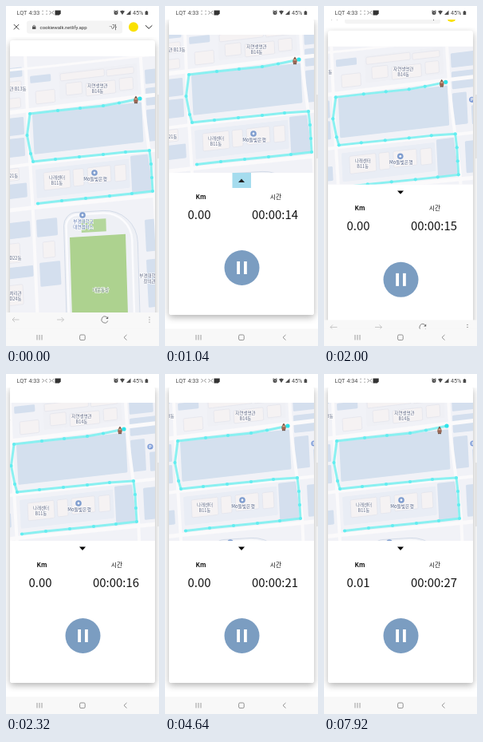
These frames come from a looping animation (192x426 px, 8000 ms). An HTML page with a canvas:

```html
<!DOCTYPE html>
<html lang="ko">
<head>
<meta charset="utf-8">
<title>Walk tracker</title>
<style>
html, body { margin: 0; width: 100%; height: 100%; overflow: hidden; background: #fff; }
canvas { display: block; width: 192px; height: 426px; }
</style>
</head>
<body>
<canvas id="stage"></canvas>
<script>
const W = 192, H = 426, LOOP = 8000, STEP = 80, HEAD = 27;
const KR = '"Noto Sans CJK KR", "Noto Sans CJK", sans-serif';
const UI = 'Roboto, "Noto Sans", sans-serif';
const BLUE = '#d4dfee', PALE = '#e9edf5';
const canvas = document.getElementById('stage');
const c = canvas.getContext('2d');
const dpr = window.devicePixelRatio || 1;
canvas.width = W * dpr;
canvas.height = H * dpr;

// keyframes: [time, value...]
const HEADER = [[80, 1], [560, 0], [1200, 0], [1680, 0.85], [1840, 0.85], [2240, 0]];
const PAN = [[80, 0, 0], [880, 0, -22], [1200, 0, -22], [1680, -10.5, 3], [2320, -20, -20], [2800, -14, -24]];
const WALKER = [[0, 163, 117.5], [4880, 163, 117.5], [5120, 163, 120.5], [6560, 163, 120.5], [7360, 159, 121.5]];
const ROUTE = [[168, 116], [142, 121.5], [122, 125], [93, 128], [65, 131], [30, 135], [26.5, 162], [31, 185],
  [34, 195], [62, 192], [92, 189], [122, 186], [150, 183], [180, 181], [182, 198], [183, 215], [184, 232],
  [158, 235], [130, 238], [100, 241], [70, 244], [40, 247.5]];

function at(keys, t) {
  if (t <= keys[0][0]) return keys[0].slice(1);
  for (let i = 1; i < keys.length; i++) {
    const a = keys[i - 1], b = keys[i];
    if (t < b[0]) {
      const u = (t - a[0]) / (b[0] - a[0]), e = u * u * (3 - 2 * u);
      return a.slice(1).map((v, k) => v + (b[k + 1] - v) * e);
    }
  }
  return keys[keys.length - 1].slice(1);
}

function rect(x, y, w, h, fill) { c.fillStyle = fill; c.fillRect(x, y, w, h); }

function round(x, y, w, h, r, fill) {
  c.beginPath(); c.roundRect(x, y, w, h, r);
  c.fillStyle = fill; c.fill();
}

function disc(x, y, r, fill) {
  c.beginPath(); c.arc(x, y, r, 0, Math.PI * 2);
  c.fillStyle = fill; c.fill();
}

function poly(pts, fill) {
  c.beginPath(); pts.forEach(p => c.lineTo(...p)); c.closePath();
  c.fillStyle = fill; c.fill();
}

function line(pts, color, width = 1) {
  c.beginPath(); pts.forEach((p, i) => i ? c.lineTo(...p) : c.moveTo(...p));
  c.strokeStyle = color; c.lineWidth = width; c.stroke();
}

function text(s, x, y, font, color, align = 'center') {
  c.font = font; c.fillStyle = color; c.textAlign = align;
  c.fillText(s, x, y);
}

// block following the tilt of the streets
function block(x, y, w, h, fill, edge) {
  c.save();
  c.transform(1, -0.115, 0.05, 1, x, y);
  round(0, 0, w, h, 1.5, fill);
  if (edge) { c.strokeStyle = edge; c.lineWidth = 0.5; c.stroke(); }
  c.restore();
}

const house = (x, y, w, h) => block(x, y, w, h, '#f5f2f3', '#dcdee8');

function label(s, x, y, color = '#5a6480', size = 5.5) {
  c.font = `500 ${size}px ${KR}`;
  c.textAlign = 'center';
  c.strokeStyle = 'rgba(255,255,255,.85)';
  c.lineWidth = 1.4;
  c.strokeText(s, x, y);
  text(s, x, y, c.font, color);
}

function pin(x, y) {
  disc(x, y, 3.8, '#7f9dcf');
  disc(x, y, 1.4, '#fff');
}

function stadium() {
  c.save();
  c.transform(1, -0.06, 0.03, 1, 80, 290);
  round(-7, -31, 92, 200, [16, 42, 0, 0], '#eef0f5');
  c.strokeStyle = '#c3cfe0'; c.lineWidth = 0.6; c.stroke();
  c.beginPath();
  c.roundRect(-4, -28, 82, 200, [14, 36, 0, 0]);
  c.strokeStyle = '#fbfbfd'; c.lineWidth = 2.5; c.stroke();
  rect(15, -21, 31, 16, '#b4d79c');
  rect(0, 0, 70, 130, '#add28f');
  c.restore();
}

function walker(x, y) {
  poly([[x, y - 5], [x + 2, y - 2], [x - 2, y - 2]], '#6b4a3c');
  c.beginPath(); c.ellipse(x, y + 0.8, 2.7, 3.6, 0, 0, 7);
  c.fillStyle = '#96705b'; c.fill();
  rect(x - 1.4, y - 1.8, 2.8, 1.6, '#d3a88f');
  rect(x - 1.7, y + 0.9, 3.4, 1, '#a8544a');
  rect(x - 1.8, y + 3.4, 1.3, 1.3, '#59413a');
  rect(x + 0.5, y + 3.4, 1.3, 1.3, '#59413a');
}

function map(t, dx, dy) {
  c.translate(dx, dy);
  rect(-40, 0, 290, 460, '#f1f2f7');
  // shaded lots
  block(33, 136, 137, 50, '#d4e0ee');
  block(156, 188, 24, 46, BLUE);
  block(37, 205, 117, 36, PALE);
  block(66, 83, 98, 34, '#eff0f5');
  for (const [x, y, w, h] of [[-14, 143, 36, 22], [-14, 169, 37, 23], [-14, 226, 40, 18],
      [174, 80, 30, 18], [175, 103, 34, 22], [176, 130, 18, 40], [200, 145, 24, 24], [192, 190, 30, 40],
      [-12, 274, 42, 20], [-12, 330, 46, 14], [38, 268, 26, 22], [42, 322, 26, 30],
      [174, 268, 24, 40], [176, 318, 24, 60], [30, 88, 26, 9], [-12, 80, 32, 12]])
    block(x, y, w, h, BLUE);
  // streets
  line([[-30, 138], [22, 131.5], [168, 113.5], [230, 106]], '#fbfafb', 5);
  line([[-30, 206], [32, 198], [230, 176]], '#fbfafb', 4);
  line([[-30, 260], [40, 252], [230, 233]], '#fbfafb', 5);
  line([[24, 60], [28, 160], [34, 260], [40, 400]], '#fbfafb', 4);
  line([[168, 50], [173, 130], [186, 230], [194, 400]], '#fbfafb', 4);
  line([[-30, 84], [60, 75], [230, 56]], '#fbfafb', 3);
  // buildings
  house(68, 85, 55, 9); house(75, 97, 20, 15); house(100, 97, 37, 16);
  house(126, 80, 34, 8); house(142, 91, 17, 15);
  house(37, 107, 24, 16); house(-10, 97, 29, 13); house(-10, 118, 28, 12);
  house(47, 209, 33, 22); house(84, 205, 13, 21);
  house(102, 203, 29, 20); house(136, 200, 14, 20);
  house(-9, 206, 25, 15); house(-10, 300, 27, 24);
  house(-8, 352, 29, 25); house(46, 296, 15, 20);
  stadium();

  label('관 B13동', 15, 106);
  label('자연생명관', 115, 102); label('B14동', 115, 109);
  label('나래센터', 64, 216.5); label('B11동', 64, 223.5);
  label('B21동', 8, 215);
  label('D22동', 12, 318);
  label('처리관', 12, 362); label('D24동', 12, 369);
  label('부경대학교', 180, 340); label('창의관', 180, 347);
  label('대운동장', 119, 358, '#4f7058');
  pin(111, 209);
  label('Mo들빛은행', 112, 218.5, '#48587f', 5.8);
  pin(96, 262);
  label('부경대학교', 97, 272, '#5a76b0'); label('대연캠퍼스', 97, 279, '#5a76b0');
  disc(201, 138, 3.6, '#7f9dd8');
  text('P', 201, 140, `bold 5.5px ${UI}`, '#fff');

  c.lineJoin = 'round';
  line(ROUTE, 'rgba(120,240,240,.85)', 3);
  ROUTE.forEach(p => disc(p[0], p[1], 2.1, '#62edf0'));
  disc(168, 116, 2.6, '#2ee4ea');
  walker(...at(WALKER, t));
}

function panel(t, open, pressed, y, bottom) {
  rect(5, y, 182, bottom - y, '#fff');
  if (pressed) rect(84.5, y, 23.5, 19, '#a5dcee');
  if (pressed || !open) poly([[92, y + 12], [100, y + 12], [96, y + 7.5]], '#222');
  else poly([[92, y + 7.6], [100, y + 7.6], [96, y + 12]], '#000');
  if (!open) return;
  const sec = 14 + Math.floor((t - 1040) / 504);
  text('Km', 45, y + 32.6, `bold 7.8px ${KR}`, '#111');
  text('시간', 139, y + 32.6, `500 7.8px ${KR}`, '#111');
  text(t < 6400 ? '0.00' : '0.01', 43, y + 57.5, `14.9px ${KR}`, '#111');
  text('00:00:' + sec, 138, y + 57.5, `14.9px ${KR}`, '#111');
  disc(96.5, y + 119, 22, '#7b9dc1');
  rect(90.2, y + 111, 3.8, 16, '#fff');
  rect(99, y + 111, 3.8, 16, '#fff');
}

function page(t, h) {
  const off = HEAD * h, top = 36 + off, bottom = 387 + off;
  const open = t >= 1040, pressed = t >= 960 && t < 1200;
  const fold = open ? 209 + off : bottom - 20;
  c.save();
  c.shadowColor = 'rgba(0,0,0,.3)';
  c.shadowBlur = 9 * dpr; c.shadowOffsetY = 3 * dpr;
  round(5, 16 + off, 182, 371, 3, '#fff');
  c.restore();
  c.save();
  c.beginPath(); c.rect(5, top, 182, fold - top); c.clip();
  const [px, py] = at(PAN, t);
  map(t, px, py + off - HEAD);
  c.restore();
  c.save();
  c.beginPath(); c.roundRect(5, 16 + off, 182, 371, 3); c.clip();
  panel(t, open, pressed, fold, bottom);
  c.restore();
}

function header(h) {
  c.save();
  c.translate(0, -HEAD * (1 - h));
  rect(0, 12, W, 27, '#fff');
  round(26, 18.5, 120, 16, 3, '#f4f4f4');
  line([[9.8, 23], [16.2, 29.4]], '#333', 0.9);
  line([[16.2, 23], [9.8, 29.4]], '#333', 0.9);
  rect(33, 25.6, 4.4, 3.4, '#555');
  c.beginPath(); c.arc(35.2, 25.6, 1.4, Math.PI, 0);
  c.strokeStyle = '#555'; c.lineWidth = 0.7; c.stroke();
  text('cookiewalk.netlify.app', 42.5, 28.6, `6px ${UI}`, '#333', 'left');
  text('ㄱ', 131, 28, `5px ${KR}`, '#333');
  text('가', 136, 29, `7px ${KR}`, '#222');
  disc(160, 26.2, 6, '#fae100');
  line([[175, 24.3], [179.2, 28.3], [183.4, 24.3]], '#222', 1);
  c.restore();
}

function toolbar(h) {
  c.save();
  c.translate(0, 21 * (1 - h));
  rect(0, 384, W, 21, '#f8f8f8');
  line([[16.5, 393], [8, 393]], '#bbb', 0.8);
  line([[11, 390], [8, 393], [11, 396]], '#bbb', 0.8);
  line([[64, 393], [72.5, 393]], '#bbb', 0.8);
  line([[69.5, 390], [72.5, 393], [69.5, 396]], '#bbb', 0.8);
  c.beginPath(); c.arc(124, 393, 4, 0.4, 5.6);
  c.strokeStyle = '#666'; c.lineWidth = 0.8; c.stroke();
  poly([[128.2, 389], [128.2, 392], [125.2, 392]], '#666');
  for (let i = -1; i < 2; i++) disc(180, 393 + i * 3, 0.6, '#666');
  c.restore();
}

function navbar() {
  rect(0, 404.5, W, 22, '#f8f8f8');
  for (let x = 39; x < 47; x += 3) line([[x, 412], [x, 418.5]], '#777', 0.7);
  c.beginPath(); c.roundRect(92.6, 412, 6.6, 6.6, 1.5);
  c.strokeStyle = '#777'; c.lineWidth = 0.8; c.stroke();
  line([[151.5, 412], [148, 415.3], [151.5, 418.6]], '#777', 0.8);
}

function status(t) {
  rect(0, 0, W, 17, '#fff');
  const font = `7.2px ${UI}`, ink = '#4a4a4a';
  text('LQT', 13.5, 10.8, font, ink, 'left');
  text(t < 6400 ? '4:33' : '4:34', 42.3, 10.8, font, ink, 'right');
  // blinking capture marks
  const tight = Math.floor((t - 100) / 250) % 2 === 0;
  if (tight) {
    line([[45.5, 6], [47.6, 8.3], [45.5, 10.7]], '#666', 0.7);
    line([[51.5, 6], [49.4, 8.3], [51.5, 10.7]], '#666', 0.7);
  } else {
    for (const x of [46, 51]) for (const y of [6.2, 10.2]) rect(x - 0.5, y - 0.5, 1.1, 1.1, '#777');
  }
  line([[54.5, 6], [56.6, 8.3], [54.5, 10.7]], '#666', 0.7);
  line([[60, 6], [58, 8.3], [60, 10.7]], '#666', 0.7);
  poly([[61.5, 5.5], [68.7, 5.5], [68.7, 9.5], [66.7, 11.4], [61.5, 11.4]], '#333');
  // alarm, wifi, signal, battery
  disc(138, 8.6, 2.5, ink);
  line([[135.2, 6.5], [136.6, 5.5]], ink, 0.9);
  line([[139.4, 5.5], [140.8, 6.5]], ink, 0.9);
  line([[138, 7.3], [138, 8.8], [139, 8.8]], '#fff', 0.5);
  poly([[143, 6.6], [146, 5.6], [149, 6.6], [146, 11]], ink);
  poly([[151, 11], [156.5, 11], [156.5, 5.6]], ink);
  text('45%', 159, 10.8, font, ink, 'left');
  rect(174.6, 6.8, 3.6, 4.2, ink);
  rect(175.6, 6, 1.6, 1, ink);
}

function draw(now) {
  const t = Math.floor((now % LOOP) / STEP) * STEP;
  const [h] = at(HEADER, t);
  c.setTransform(dpr, 0, 0, dpr, 0, 0);
  rect(0, 0, W, H, '#fff');
  page(t, h);
  if (h > 0) { header(h); toolbar(h); }
  status(t);
  navbar();
  rect(190, 111, 1.6, 80, '#dcdcdc');
}

const start = performance.now();
function tick() {
  draw(performance.now() - start);
  requestAnimationFrame(tick);
}
tick();
</script>
</body>
</html>
```
